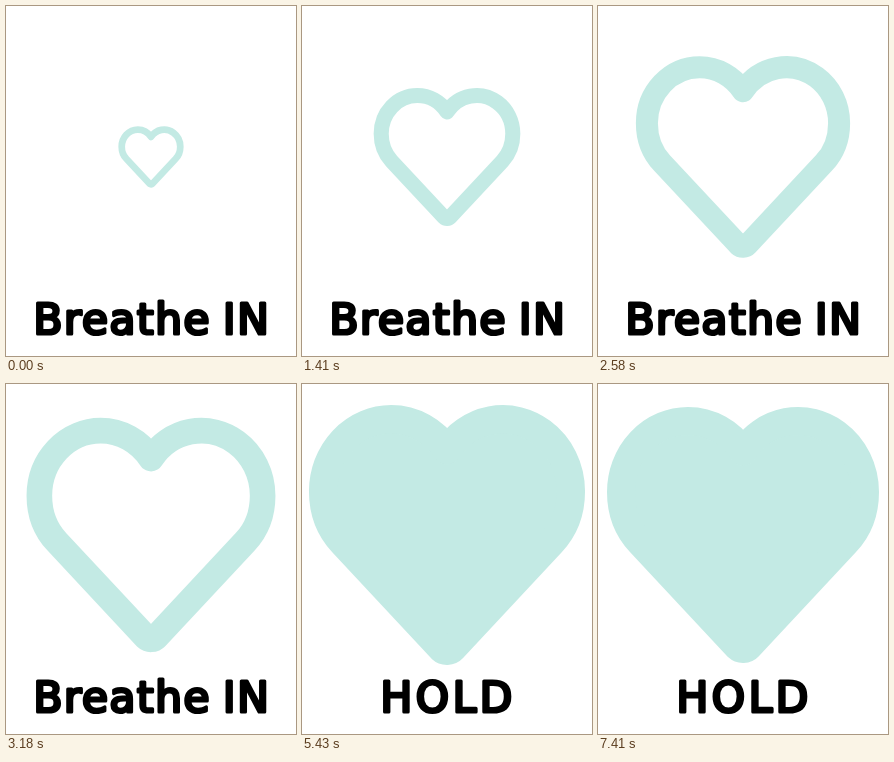
Write an HTML page with a canvas that moves like this. It is 290 by 350 pixels and loops after 8 s.

```html
<!DOCTYPE html>
<html lang="en">
<head>
<meta charset="utf-8">
<title>Breathe</title>
<style>
  html, body { margin: 0; width: 100%; height: 100%; overflow: hidden; background: #fff; }
  canvas { display: block; }
</style>
</head>
<body>
<canvas id="stage" width="290" height="350"></canvas>
<script>
const ctx = document.getElementById('stage').getContext('2d');

const LOOP = 8000;
const STEP = 30;
const HOLD_AT = 3600;
const GROW_TIME = 3580;
const START_SCALE = 0.24;
const BEATS = [3750, 4500, 5400, 6300, 7200];
const BEAT_TIME = 200;
const BEAT_GAIN = 0.05;
const MINT = '#c3eae4';

// Centre line of the heart at full size, around its own middle.
function makeHeart() {
  const path = new Path2D();
  const lobeX = 55, lobeY = -43, rx = 67, ry = 71;
  const notch = -Math.acos(lobeX / rx);
  const tipTurn = 0.75;
  path.moveTo(-5.8, 111.5);
  path.lineTo(-102.8, 7.5);
  path.bezierCurveTo(-115, -5.5, -122, -23, -122, lobeY);
  path.ellipse(-lobeX, lobeY, rx, ry, 0, Math.PI, Math.PI * 2 + notch);
  path.ellipse(lobeX, lobeY, rx, ry, 0, Math.PI - notch, Math.PI * 2);
  path.bezierCurveTo(122, -23, 115, -5.5, 102.8, 7.5);
  path.lineTo(5.8, 111.5);
  path.arc(0, 106, 8, tipTurn, Math.PI - tipTurn);
  path.closePath();
  return path;
}

const heart = makeHeart();

function beat(t) {
  const start = BEATS.find(b => t >= b && t < b + BEAT_TIME);
  if (start === undefined) return 0;
  return 1 - Math.abs((t - start) / (BEAT_TIME / 2) - 1);
}

function heartScale(t) {
  if (t < HOLD_AT) {
    return Math.min(1, START_SCALE + (1 - START_SCALE) * t / GROW_TIME);
  }
  return 1 + BEAT_GAIN * beat(t);
}

function drawHeart(scale, filled) {
  ctx.save();
  ctx.translate(145, 151);
  ctx.scale(scale, scale);
  ctx.lineWidth = 28;
  ctx.lineJoin = 'round';
  ctx.strokeStyle = ctx.fillStyle = MINT;
  if (filled) ctx.fill(heart);
  ctx.stroke(heart);
  ctx.restore();
}

// A round outline softens the letter ends.
function drawLabel(text, x, tracking) {
  ctx.font = '42.2px "DejaVu Sans", sans-serif';
  ctx.letterSpacing = `${tracking}px`;
  ctx.wordSpacing = '-3px';
  ctx.lineWidth = 3.2;
  ctx.lineJoin = 'round';
  ctx.strokeStyle = ctx.fillStyle = '#000';
  ctx.fillText(text, x, 328.4);
  ctx.strokeText(text, x, 328.4);
}

function draw(now) {
  const t = Math.floor(((now + 0.5) % LOOP) / STEP) * STEP;
  const holding = t >= HOLD_AT;
  ctx.fillStyle = '#fff';
  ctx.fillRect(0, 0, 290, 350);
  drawHeart(heartScale(t), holding);
  if (holding) drawLabel('HOLD', 78.5, 3.6);
  else drawLabel('Breathe IN', 27.5, 1.6);
}

let origin;
function tick(now) {
  origin ??= now;
  draw(now - origin);
  requestAnimationFrame(tick);
}

draw(0);
requestAnimationFrame(tick);
</script>
</body>
</html>
```
